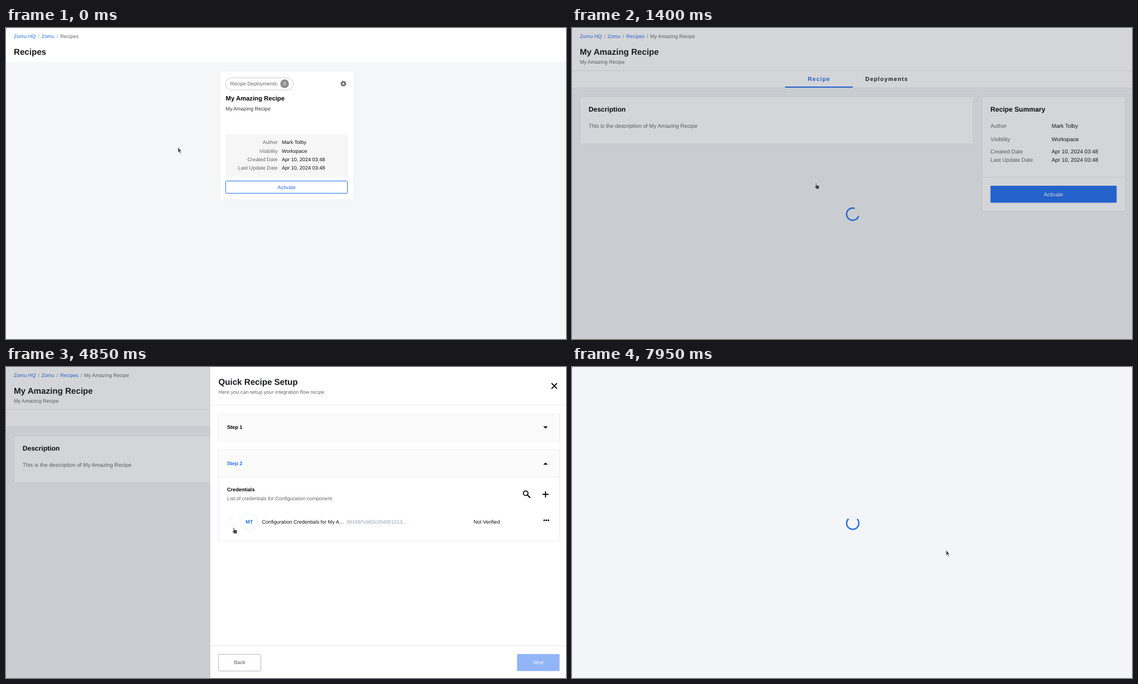
Recreate the animation shown at these times as an HTML page. Size 1003 px wide and 558 px high, loop 8 s.

```html
<!DOCTYPE html>
<html lang="en">
<head>
<meta charset="utf-8">
<title>Recipe setup</title>
<style>
html, body { margin: 0; width: 100%; height: 100%; overflow: hidden; background: #fff; }
svg { display: block; width: 1003px; height: 558px; font-family: "Liberation Sans", Arial, sans-serif; text-rendering: geometricPrecision; }
</style>
</head>
<body>
<svg id="stage" viewBox="0 0 1003 558"></svg>
<script>
const BLUE = '#246ff0', PALE = '#92b5f8', GREY = '#666', INK = '#111';
const LOOP = 8000, STEP = 50;
const org = 'Zomu', author = 'Mark Tolby', initials = 'MT', recipe = 'My Amazing Recipe';
const date = 'Apr 10, 2024 03:48';

// y is the middle of the capital letters
const text = (x, y, s, fill = INK, size = 9.09, extra = '') =>
  `<text x="${x}" y="${y + size * 0.36}" fill="${fill}" font-size="${size}" ${extra}>${s}</text>`;
const bold = (x, y, s, fill = '#000', size = 9.09, extra = '') =>
  text(x, y, s, fill, size, 'font-weight="700" ' + extra);
const mid = 'text-anchor="middle"', end = 'text-anchor="end"';
const rect = (x, y, w, h, fill, extra = '') =>
  `<rect x="${x}" y="${y}" width="${w}" height="${h}" fill="${fill}" ${extra}/>`;
const circle = (x, y, r, fill, extra = '') =>
  `<circle cx="${x}" cy="${y}" r="${r}" fill="${fill}" ${extra}/>`;
const line = (d, stroke, width = 1) =>
  `<path d="${d}" fill="none" stroke="${stroke}" stroke-width="${width}"/>`;
const group = (id, ...parts) => `<g id="${id}">${parts.join('')}</g>`;
const edge = c => `stroke="${c}"`;

const spinner = (id, x, y) => `<g transform="translate(${x} ${y})">` +
  circle(0, 0, 11, 'none', 'stroke="#eee" stroke-width="2.4"') +
  `<g id="${id}">` + circle(0, 0, 11, 'none',
    `stroke="${BLUE}" stroke-width="2.4" pathLength="4" stroke-dasharray="3 1"`) + '</g></g>';

const crumbs = (...last) => {
  const items = [[14, org + ' HQ'], [63.5, org], [97, 'Recipes'], [140, recipe]];
  const count = last.length ? 4 : 3;
  return items.slice(0, count).map(([x, s], i) =>
    text(x, 15, s, i === count - 1 ? GREY : BLUE) +
    (i ? text(x - 6.2, 15, '/', '#888') : '')).join('');
};

const summary = [['Author', author], ['Visibility', 'Workspace'],
  ['Created Date', date], ['Last Update Date', date]];

const listPage = () => group('listPage',
  rect(0, 0, 1003, 558, '#f5f6f8'), rect(0, 0, 1003, 61, '#fff'),
  crumbs(), bold(14, 42.2, 'Recipes', '#17181c', 15.13),
  rect(382.5, 77.5, 240.5, 230.5, '#fff', edge('#eef0f2')),
  rect(393.5, 89.5, 121, 21.5, '#fff', 'rx="10.75" ' + edge('#ccc')),
  text(401.5, 99.8, 'Recipe Deployments:', GREY),
  circle(499, 100, 7.7, '#8b8b8b'), text(499, 100, '0', '#fff', 9.09, mid),
  circle(604.3, 99.8, 3, 'none', 'stroke="#666" stroke-width="2.3"'),
  circle(604.3, 99.8, 4.5, 'none', 'stroke="#666" stroke-width="1.7" pathLength="12" stroke-dasharray="1 1"'),
  bold(393.5, 126.3, recipe, '#000', 11.29), text(393.5, 144.6, recipe, '#333'),
  rect(393, 191, 219, 76, '#f6f6f6'),
  ...summary.map(([k, v], i) => {
    const y = 205.2 + i * 15.25;
    return text(486.5, y, k, GREY, 9.09, end) + text(494, y, v);
  }),
  rect(393.5, 274.5, 218, 22, '#fff', `id="activate" rx="1" ${edge(BLUE)}`),
  text(502.7, 285.3, 'Activate', BLUE, 9.09, 'id="activateText" ' + mid));

const detailPage = () => group('detailPage',
  rect(0, 0, 1003, 558, '#f1f5f7'), rect(0, 0, 1003, 107, '#fff'),
  crumbs(recipe), bold(14, 42.2, recipe, '#17181c', 15.13), text(14, 60.3, recipe, GREY),
  line('M0 76.5H1003M0 107.5H1003', '#e6e8ec'),
  bold(442.5, 91.3, 'Recipe', BLUE, 10.4, 'letter-spacing="1.04" ' + mid),
  bold(563.7, 91.3, 'Deployments', '#222', 10.4, 'letter-spacing="1.04" ' + mid),
  rect(381.5, 105, 121.5, 2, BLUE),
  rect(14.5, 123.5, 704, 84.5, '#fff', edge('#e9ecef')),
  bold(29.7, 145.8, 'Description', '#000', 12.1),
  text(29.7, 175.2, 'This is the description of ' + recipe, GREY, 9.8),
  rect(734.5, 123.5, 256.5, 205, '#fff', edge('#e9ecef')),
  bold(749.5, 145.8, 'Recipe Summary', '#000', 12.1),
  ...summary.map(([k, v], i) => {
    const y = [175.7, 199, 221.5, 236.6][i];
    return text(749.5, y, k, GREY, 9.8) + text(859, y, v, INK, 9.8);
  }),
  line('M735 267.5H991', '#e6e8ec'),
  rect(749.5, 283, 226, 30.5, BLUE, 'rx="1"'),
  text(862.4, 298.2, 'Activate', '#fff', 9.8, mid),
  spinner('pageSpin', 502.8, 334),
  rect(0, 0, 1003, 558, 'rgba(40,45,60,.2)'));

const panel = (n, y, item) => {
  const caret = item ? 'M962.3 2h8l-4-4z' : 'M962.3-2h8l-4 4z';
  let out = rect(380.5, y, 611, item ? 163.5 : 49, '#fff', edge('#eaecef')) +
    rect(381, y + 0.5, 610, 48.5, '#fbfbfb') +
    bold(396, y + 24, 'Step ' + n, item ? BLUE : '#000', 9.09, item ? `id="title${n}"` : '') +
    `<path d="${caret}" transform="translate(0 ${y + 24.5})"/>`;
  if (!item) return out;
  const [target, name, key] = item, row = y + 128.8;
  return out + line(`M381 ${y + 49}H991`, '#eaecef') +
    bold(396, y + 71.5, 'Credentials') +
    text(396, y + 86.7, 'List of credentials for ' + target, GREY) +
    circle(930.8, y + 77.8, 4.1, 'none', 'stroke="#000" stroke-width="1.8"') +
    line(`M933.8 ${y + 80.8}l5.2 5.2`, '#000', 2.1) +
    line(`M960.8 ${y + 79.8}h11M966.3 ${y + 74.3}v11`, '#000', 1.8) +
    group('row' + n,
      circle(404, row, 7, '#fff', edge('#eee')),
      circle(404, row, 3.1, BLUE, `id="dot${n}"`),
      circle(435.6, row, 15, '#fff', edge('#ececec')),
      bold(435.8, row, initials, BLUE, 9.3, mid),
      text(458.5, row, name), text(610, row, key, '#8f9dbd'),
      text(837.5, row, 'Not Verified'),
      ...[-3.8, 0, 3.8].map(d => circle(967.8 + d, row - 2.4, 1.5, '#000')));
};

const drawer = () => group('drawer',
  rect(366, 0, 640, 558, '#fff'),
  bold(380.5, 27, 'Quick Recipe Setup', '#17181c', 15.13),
  text(380.5, 44.8, 'Here you can setup your integration flow recipe', GREY),
  line('M977.2 29.2l9.6 9.6m0-9.6l-9.6 9.6', '#000', 1.9),
  line('M366 68.5H1003', '#e9ebee'),
  group('loading', spinner('drawerSpin', 685.8, 280)),
  group('step1',
    panel(1, 84, ['Webhook', 'Webhook credentials for Amazing …', '661694ac79d1e90012f65…']),
    panel(2, 263)),
  group('step2',
    panel(1, 84),
    panel(2, 148.7, ['Configuration component', 'Configuration Credentials for My A…', '661697cb82c204001213…']),
    rect(380.5, 515.5, 76, 30, '#fff', 'rx="1" ' + edge('#bbb')),
    text(418.5, 530, 'Back', '#555', 9.09, mid)),
  group('footer', line('M366 499.5H1003', '#e9ebee'),
    rect(915.3, 515, 76.2, 30.5, BLUE, 'id="next" rx="1.5"'),
    rect(915.3, 515, 76.2, 30.5, 'url(#stripes)', 'id="busy" rx="1.5"'),
    text(953.3, 530, 'Next', '#fff', 9.09, 'id="nextText" ' + mid)));

document.getElementById('stage').innerHTML =
  `<defs><pattern id="stripes" width="14" height="14" patternUnits="userSpaceOnUse">${rect(0, 0, 7, 14, '#88a9e4')}</pattern></defs>` +
  listPage() + detailPage() + drawer() +
  group('loadPage', rect(0, 0, 1003, 558, '#f4f5f8'), spinner('loadSpin', 502.8, 280.3)) +
  '<g id="cursor" fill="#444" stroke="#fff" stroke-width=".6">' +
  '<path id="arrow" d="M0 0V9.6L2.2 7.7 3.7 11.4 5.3 10.7 3.8 7.2H6.6Z"/>' +
  '<path id="hand" d="M.2 1.6q.9-1.1 1.8 0V5l4 .6q1.2.4 1 1.6L6.4 12H2L-1.8 8.2q-.2-1.3.8-1L.2 8Z"/></g>';

const $ = id => document.getElementById(id);
const show = (id, on) => $(id).setAttribute('visibility', on ? 'inherit' : 'hidden');
const set = (id, name, value) => $(id).setAttribute(name, value);
const clamp = v => Math.max(0, Math.min(1, v));
const within = (t, a, b) => t >= a && t < b;
const spin = (id, gap) => set(id, 'transform', `rotate(${gap - 45})`);
const mix = (a, b, p) => `rgb(${a.map((v, i) => Math.round(v + (b[i] - v) * p))})`;

const path = [[0, 308, 214], [550, 308, 214], [850, 425, 298], [1000, 436, 277],
  [2900, 436, 277], [3350, 399, 212], [3950, 399, 212], [4600, 407, 287],
  [5300, 407, 287], [5400, 405, 283], [5650, 405, 283], [6350, 959, 525],
  [6950, 959, 525], [7400, 670, 328.5], [LOOP, 670, 328.5]];
const handTimes = [[850, 1500], [3250, 4050], [4450, 5750], [6200, 6650]];

function cursorAt(t) {
  const i = path.findIndex(k => k[0] > t);
  const [t0, x0, y0] = path[i - 1], [t1, x1, y1] = path[i];
  const p = (t - t0) / (t1 - t0), e = p * p * (3 - 2 * p);
  return [x0 + (x1 - x0) * e, y0 + (y1 - y0) * e];
}

function draw(t) {
  const hover = t >= 850;
  show('listPage', t < 1300);
  set('activate', 'fill', hover ? BLUE : '#fff');
  set('activateText', 'fill', hover ? '#fff' : BLUE);

  const left = t >= 7200;
  show('detailPage', t >= 1300 && !left);
  spin('pageSpin', 45 + 0.36 * Math.max(0, t - 1350));

  const away = (1 - clamp((t - 1430) / 200)) ** 3;
  show('drawer', t >= 1430 && !left);
  set('drawer', 'transform', `translate(${637 * away} 0)`);
  set('drawer', 'opacity', 1 - away);
  show('loading', t < 1700);
  spin('drawerSpin', 168 + 0.36 * (t - 1600));

  const second = t >= 4850;
  show('step1', t >= 1700 && !second);
  show('step2', second);
  show('footer', t >= 1700);
  show('row1', t >= 1850 && !second);
  show('dot1', within(t, 3850, 4850));
  show('dot2', t >= 5550);

  const ready = clamp((t - 1950) / 250), busy = t >= 6650;
  const enabled = !within(t, 4850, 5550) && !busy;
  const hot = within(t, 6250, 6650);
  set('title1', 'fill', mix([0, 0, 0], [36, 111, 240], ready));
  set('next', 'fill', hot ? '#1f60d2' : enabled ? mix([146, 181, 248], [36, 111, 240], ready) : PALE);
  $('nextText').textContent = t >= 5550 ? 'Finish' : 'Next';
  show('busy', busy);
  set('stripes', 'patternTransform', `translate(${t * 0.02} 0) rotate(-45)`);

  show('loadPage', left);
  spin('loadSpin', 2 + 0.36 * (t - 7950));
  // children with their own visibility must follow their hidden parents
  if (left) ['loading', 'step2', 'footer', 'dot2', 'busy'].forEach(id => show(id, false));

  const hand = handTimes.some(([a, b]) => within(t, a, b));
  set('cursor', 'transform', `translate(${cursorAt(t)})`);
  show('hand', hand);
  show('arrow', !hand);
}

const start = performance.now();
function frame() {
  const t = (performance.now() - start) % LOOP;
  draw(Math.floor(t / STEP) * STEP);
  requestAnimationFrame(frame);
}
frame();
</script>
</body>
</html>
```
